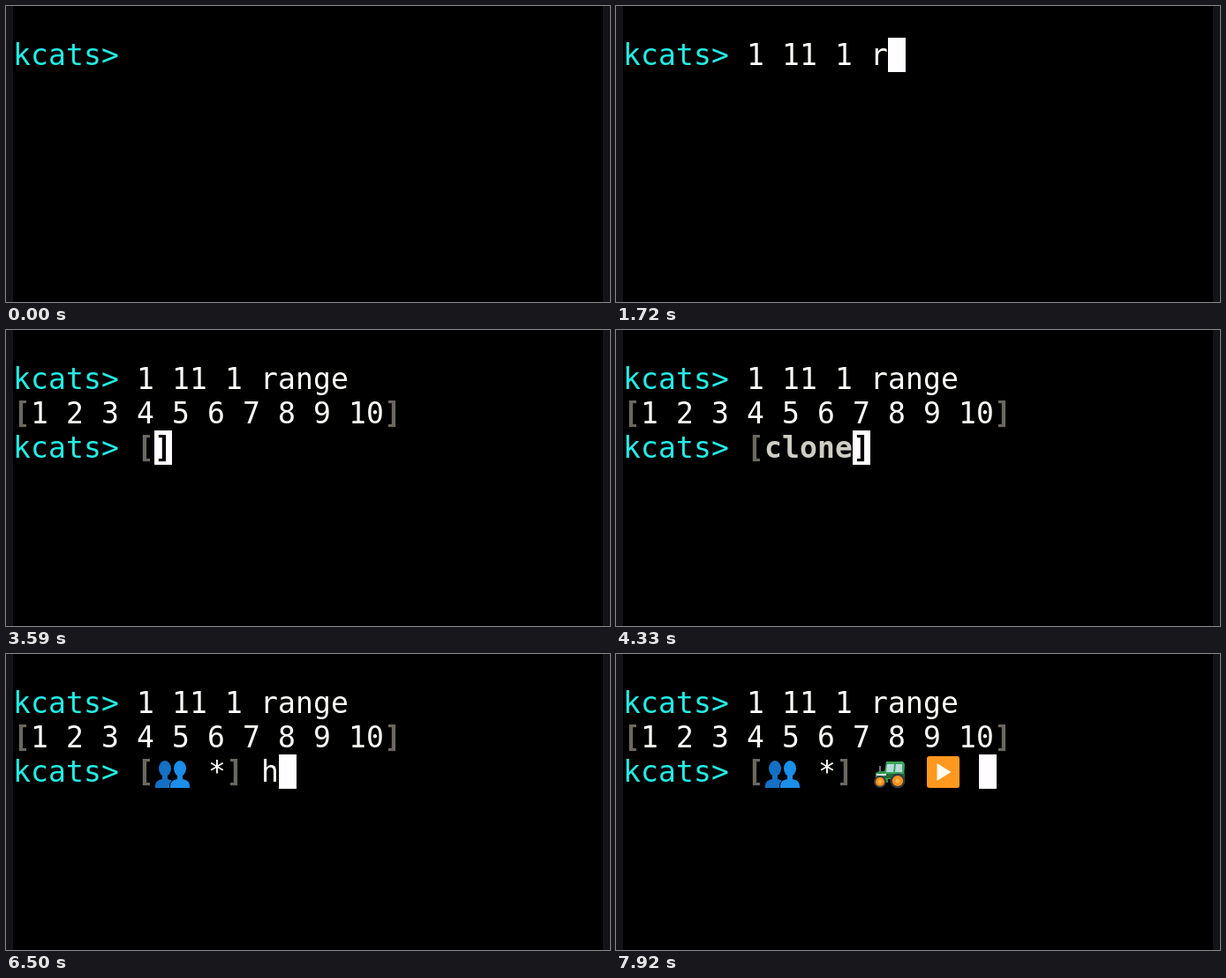
Recreate the animation shown at these times as an HTML page with a canvas. Size 684 by 336 pixels, loop 8 s.

```html
<!DOCTYPE html>
<html lang="en">
<head>
<meta charset="utf-8">
<title>kcats session</title>
<style>
  html, body { margin: 0; height: 100%; overflow: hidden; background: #000; }
  canvas { display: block; }
</style>
</head>
<body>
<canvas id="stage" width="684" height="336"></canvas>
<script>
const ctx = document.getElementById('stage').getContext('2d');
const LOOP = 8000, LEFT = 8, TOP = 36, CELL = 20, ICON = 41, ROW = 39, ASCENT = 31;
const TEXT = '#fffffa', DIM = '#6b675f', KEYWORD = '#cfcdc4', PROMPT = '#1feee6';
const CURSOR = '#fffdff', FRINGE = '#131318';
const ENTER = 2390;

// Timeline of the input line; "|" marks the cursor.
const states = [[0, '']];
const at = (time, line) => states.push([time, line]);
const type = (start, step, before, word, after = '') =>
  [...word].forEach((_, i) => at(start + i * step, before + word.slice(0, i + 1) + '|' + after));

at(150, '|');
type(300, 150, '', '1 11 ');
at(1350, '1 11 1|');
at(1530, '1 11 1 |');
at(1720, '1 11 1 r|');
type(1870, 130, '1 11 1 r', 'ange');
at(ENTER, '|');
at(2840, '');
at(3290, '|');
at(3590, '[|]');
type(3738, 148, '[', 'clone', ']');
at(4480, '[👥|]');
at(4560, '[👥 |]');
at(5080, '[👥 *|]');
at(5230, '[👥 * |]');
at(5610, '[👥 *|]');
at(5900, '[👥 *]|');
at(6050, '[👥 *] |');
type(6430, 82, '[👥 *] ', 'harvest');
at(7030, '[👥 *] 🚜|');
at(7130, '[👥 *] 🚜 |');
at(7250, '[👥 *] 🚜 e|');
at(7320, '[👥 *] 🚜 ex|');
at(7400, '[👥 *] 🚜 exe|');
type(7550, 92, '[👥 *] 🚜 exe', 'cute');
at(7920, '[👥 *] 🚜 ▶ |');

function fill(color, draw) {
  ctx.fillStyle = color;
  ctx.beginPath();
  draw();
  ctx.fill();
}
const disc = (color, x, y, rx, ry = rx) => fill(color, () => ctx.ellipse(x, y, rx, ry, 0, 0, 7));
const shape = (color, path) => {
  ctx.fillStyle = color;
  ctx.fill(new Path2D(path));
};

function person(color, x, y) {
  disc(color, x, y, 7, 9);
  shape(color, `M${x - 3} ${y + 6}h6v6q8 1 8 8v2h-22v-2q0-7 8-8z`);
}

function wheel(x, y, r) {
  disc('#343c42', x, y, r);
  disc('#f7921e', x, y, r * .72);
  disc('#ffb84d', x, y, r * .28);
}

// Icons are drawn in a 41 by 39 box.
const icons = {
  '👥'() {
    person('#1470c4', 12, 16);
    person('#000', 28, 16);
    person('#1a8ee8', 29, 16);
  },
  '🚜'() {
    shape('#68737a', 'M9 13h2v9h-2z');
    shape('#2f8f4d', 'M5 21l4-2h10v13h-14z');
    shape('#3aa65a', 'M17 8h19l2 3-1 17h-22v-8z');
    shape('#b5dcda', 'M18 11h8l-1 9h-8zM28 11h7v9h-8z');
    shape('#1f6b3b', 'M15 22h23v5h-23z');
    shape('#dfe8e4', 'M6 22h11v2h-11z');
    wheel(10, 31, 7);
    wheel(30, 30, 8.5);
  },
  '▶'() {
    fill('#ff981f', () => ctx.roundRect(2, 2, 37, 36, 3));
    shape('#fffaf0', 'M13.5 10v20l16-10z');
  }
};

function glyph(char, x, y, color, bold) {
  ctx.font = `${bold ? 'bold ' : ''}33px "DejaVu Sans Mono", monospace`;
  ctx.fillStyle = color;
  ctx.fillText(char, x, y + ASCENT);
}

function printLine(row, line, color = TEXT, x = LEFT) {
  const y = TOP + row * ROW;
  const keyword = /clone|harvest|execute/.exec(line);
  let index = 0, underCursor = false;
  for (const char of line) {
    if (char === '|') {
      ctx.fillStyle = CURSOR;
      ctx.fillRect(x, y, CELL, ROW);
      underCursor = true;
    } else if (icons[char]) {
      ctx.save();
      ctx.translate(x, y);
      icons[char]();
      ctx.restore();
      x += ICON;
    } else {
      const bracket = '[]'.includes(char);
      const inKeyword = keyword && index >= keyword.index && index < keyword.index + keyword[0].length;
      const ink = underCursor ? '#000' : inKeyword ? KEYWORD : bracket ? DIM : color;
      glyph(char, x, y, ink, inKeyword || bracket);
      x += CELL;
      underCursor = false;
    }
    index += char.length;
  }
}

function prompt(row, input) {
  printLine(row, 'kcats>', PROMPT);
  printLine(row, input, TEXT, LEFT + 7 * CELL);
}

function render(now) {
  const time = now % LOOP;
  const input = states.findLast(([start]) => start <= time)[1];
  ctx.fillStyle = '#000';
  ctx.fillRect(0, 0, 684, 336);
  ctx.fillStyle = FRINGE;
  ctx.fillRect(0, 0, 8, 336);
  ctx.fillRect(676, 0, 8, 336);
  if (time < ENTER) {
    prompt(0, input);
  } else {
    prompt(0, '1 11 1 range');
    printLine(1, '[1 2 3 4 5 6 7 8 9 10]');
    prompt(2, input);
  }
}

const origin = performance.now();
function tick() {
  render(performance.now() - origin);
  requestAnimationFrame(tick);
}
tick();
</script>
</body>
</html>
```
